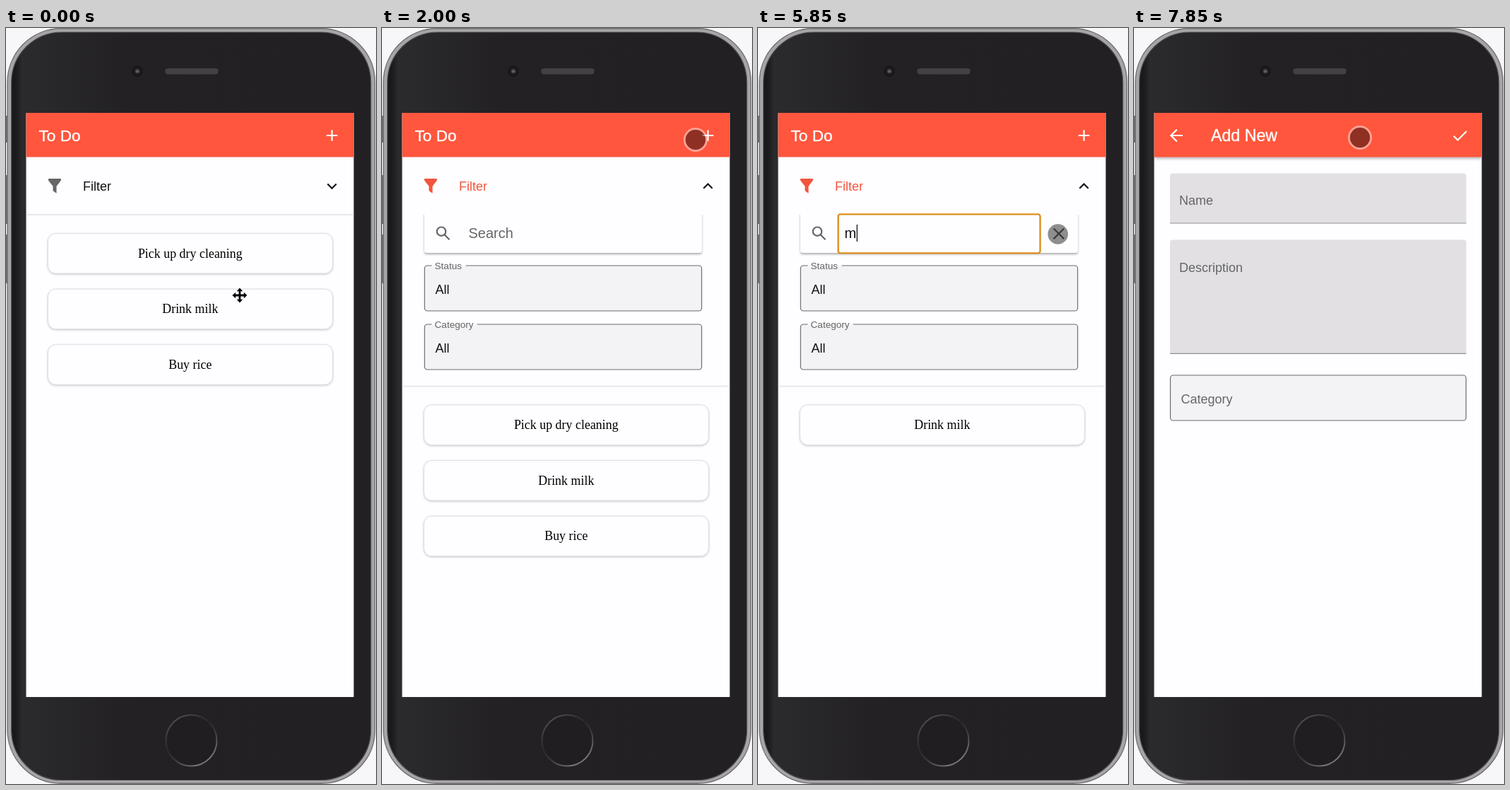
An HTML page that plays this animation: 524x1069 px, repeating every 8000 ms.

```html
<!DOCTYPE html>
<html lang="en">
<head>
<meta charset="utf-8">
<title>To do list</title>
<style>
  html, body { margin: 0; width: 100%; height: 100%; overflow: hidden; background: #f7f6f9; }
  svg { display: block; width: 100vw; height: 100vh; }
  text { font: 18px "Liberation Sans", Arial, sans-serif; fill: #111; }
  .title { font-size: 22.6px; fill: #fff; stroke: #fff; stroke-width: .4; }
  .hint { fill: #666; }
  .label { font-size: 13.6px; fill: #666; }
  .big { font-size: 20px; }
  .line { fill: none; stroke-width: 2.2; }
  .light { stroke: #fff; }
  .grey { stroke: #666; }
  .dark { stroke: #111; }
  .outlined { fill: #f3f2f5; stroke: #6c6b6e; stroke-width: 1.2; }
  .card rect { fill: #fefdff; stroke: #e0dfe5; filter: drop-shadow(0 1px 1.5px rgba(0, 0, 0, .22)); }
  .card text { font: 17.93px "Liberation Serif", "Times New Roman", serif; fill: #000; text-anchor: middle; }
  #searchBox { fill: #fefdff; filter: drop-shadow(0 2px 1.8px rgba(0, 0, 0, .32)); }
  .field { fill: #e2e0e3; }
</style>
</head>
<body>
<svg viewBox="0 0 524 1069" preserveAspectRatio="none">
  <defs>
    <linearGradient id="bodyFill">
      <stop offset="0" stop-color="#171618"/>
      <stop offset=".012" stop-color="#1b1a1c"/>
      <stop offset=".03" stop-color="#2b2a2c"/>
      <stop offset=".3" stop-color="#232123"/>
      <stop offset="1" stop-color="#222022"/>
    </linearGradient>
    <linearGradient id="ringStroke" x1=".15" y1="0" x2=".85" y2="1">
      <stop offset="0" stop-color="#555355"/>
      <stop offset=".4" stop-color="#2b292b"/>
      <stop offset=".6" stop-color="#3a383a"/>
      <stop offset=".9" stop-color="#777577"/>
      <stop offset="1" stop-color="#444244"/>
    </linearGradient>
    <pattern id="mesh" width="3" height="3" patternUnits="userSpaceOnUse">
      <rect width="3" height="3" fill="#4b494b"/>
      <path d="M0 0h1.5v1.5h-1.5zM1.5 1.5h1.5v1.5h-1.5z" fill="#3b393b"/>
    </pattern>
    <clipPath id="screenClip"><rect x="28.5" y="120" width="464" height="826"/></clipPath>
    <clipPath id="rowClip"><rect x="28.5" y="182.5" width="464" height="81.5"/></clipPath>
    <clipPath id="panelClip"><rect x="28.5" y="264" width="464" height="242"/></clipPath>
  </defs>

  <g id="phone">
    <rect width="524" height="1069" fill="#f7f6f9"/>
    <path d="M0 124h3v38h-3zM0 208h3v69h-3zM0 292h3v69h-3z" fill="#6d6c6e"/>
    <rect x="2" y=".7" width="520.5" height="1067.6" rx="76" fill="#a7a5a8" stroke="#6f6d70" stroke-width="1.4"/>
    <rect x="7.7" y="6" width="509" height="1057.5" rx="71" fill="url(#bodyFill)" stroke="#4c4a4d" stroke-width="1.2"/>
    <circle cx="186" cy="61" r="8" fill="#19181a"/>
    <circle cx="186" cy="61" r="3.6" fill="#3d3b40"/>
    <circle cx="186" cy="61.5" r="1.4" fill="#77757b"/>
    <rect x="225.5" y="57" width="75" height="8.5" rx="4" fill="url(#mesh)"/>
    <circle cx="262.5" cy="1007.5" r="36" fill="#201e20" stroke="url(#ringStroke)" stroke-width="2"/>
    <rect x="28.5" y="120" width="464" height="826" fill="#fefdff"/>
  </g>

  <g clip-path="url(#screenClip)">
    <g id="listPage">
      <g id="panel" clip-path="url(#panelClip)">
        <rect id="searchBox" x="60" y="258" width="393" height="60" rx="3"/>
        <g class="line grey">
          <circle cx="84" cy="287.7" r="6.2"/>
          <path d="M88.5 292.2l7 7"/>
        </g>
        <text id="placeholder" class="big hint" x="122.5" y="297">Search</text>
        <g id="selects"></g>
      </g>
      <g id="focus">
        <rect x="113.6" y="263.4" width="286" height="55" rx="3" fill="#fefdff" stroke="#dc8f1c" stroke-width="2.4"/>
        <text id="typed" class="big" x="122.5" y="297">m</text>
        <path id="caret" d="M0 278v24" stroke="#111" stroke-width="1.3"/>
      </g>
      <path id="clear" class="line grey" d="M418.7 283.5l14.6 14.6m0-14.6l-14.6 14.6"/>
      <circle id="ripple" cx="377" cy="184" fill="#000" clip-path="url(#rowClip)"/>
      <path id="funnel" d="M60.3 213h17.2q1 1.6 0 3l-6 7.8v10l-5-3.6v-6.4l-6.2-7.8q-1-1.4 0-3z"/>
      <text id="filterText" x="109" y="230">Filter</text>
      <path id="chevron" class="line dark" d="M-6.2-3.1L0 3.1L6.2-3.1"/>
      <path id="divider" d="M28.5 264h464" stroke="#e2e1e5" stroke-width="1.4"/>
      <g id="cards"></g>
      <rect x="28.5" y="120" width="464" height="62.5" fill="#ff563d"/>
      <text class="title" x="46.5" y="160.3">To Do</text>
      <path class="line light" d="M453.8 152h15.6m-7.8-7.8v15.6"/>
    </g>

    <g id="loading">
      <circle id="spinner" cx="260.5" cy="533" r="24" fill="none" stroke="#e9533c" stroke-width="4.8" stroke-dasharray="13.5 200"/>
    </g>

    <g id="formPage">
      <rect x="28.5" y="120" width="464" height="62.5" fill="#ff563d" style="filter:drop-shadow(0 2px 2px rgba(0,0,0,.3))"/>
      <path class="line light" d="M69 152H52.5m8.2-8.4L52.3 152l8.4 8.4"/>
      <text class="title" x="109" y="160.3" style="font-size:23.2px">Add New</text>
      <path class="line light" d="M452.8 152.8l5.7 5.7l12.4-12.6"/>
      <path class="field" d="M51 276v-66.500q0-4 4-4h411.500q4 0 4 4v66.500z"/>
      <path class="field" d="M51 460.500v-157q0-4 4-4h411.500q4 0 4 4v157z"/>
      <path d="M51 276h419.500M51 460.300h419.500" stroke="#918f93" stroke-width="1.2"/>
      <rect class="outlined" x="51.500" y="491" width="418.700" height="64" rx="4"/>
      <text class="hint" x="64" y="250">Name</text>
      <text class="hint" x="64" y="344.500">Description</text>
      <text class="hint" x="66.500" y="531">Category</text>
    </g>

    <g id="pointer">
      <g id="touch">
        <circle r="15.500" fill="none" stroke="#fff" stroke-width="3" stroke-opacity=".45"/>
        <circle r="14.300" fill="#000" fill-opacity=".44"/>
      </g>
      <path id="mover" d="M0-10.500l4.300 4.700H1.400V-1.400H5.800V-4.300L10.500 0L5.800 4.300V1.400H1.400V5.800H4.300L0 10.500L-4.300 5.800H-1.400V1.400H-5.800V4.300L-10.500 0L-5.800-4.300V-1.400H-1.400V-5.800H-4.300z" stroke="#fff" stroke-width="1.200" paint-order="stroke"/>
    </g>
  </g>
</svg>
<script>
const $ = id => document.getElementById(id);
const show = (id, on) => $(id).style.display = on ? '' : 'none';
const set = (id, attrs) => { for (const k in attrs) $(id).setAttribute(k, attrs[k]); };
const clamp = v => Math.max(0, Math.min(1, v));

const LOOP = 8000, STEP = 1000 / 7;
const CARD_TOP = 290.5, CARD_GAP = 78.6, PANEL_HEIGHT = 242.5;

$('selects').innerHTML = [['Status', 336, 48], ['Category', 419, 64]].map(([name, y, gap]) => `
  <rect class="outlined" x="60.3" y="${y}" width="392.4" height="64" rx="4"/>
  <text x="75.5" y="${y + 40}">All</text>
  <g class="floating">
    <path d="M70.5 ${y}h${gap}" stroke="#f9f8fb" stroke-width="2.4"/>
    <text class="label" x="74.5" y="${y + 5}">${name}</text>
  </g>`).join('');

$('cards').innerHTML = ['Pick up dry cleaning', 'Drink milk', 'Buy rice'].map(name => `
  <g class="card">
    <rect x="59.5" y="0" width="403" height="56.5" rx="11"/>
    <text x="260.8" y="34">${name}</text>
  </g>`).join('');
const cards = [...document.querySelectorAll('.card')];
const labels = [...document.querySelectorAll('.floating')];

// Pointer waypoints: time, x, y
const path = [
  [0, 331, 378], [570, 350, 320], [1000, 378, 195], [1140, 377, 184], [1285, 377, 184],
  [1428, 394, 178], [1714, 430, 160], [2285, 458, 156], [2428, 460, 156], [3000, 415, 220],
  [3428, 157, 305], [4000, 129, 303], [5285, 136, 302], [5428, 381, 301], [5571, 381, 301],
  [5714, 424, 292], [6285, 427, 290], [6714, 437, 257], [7285, 469, 159], [7714, 469, 159],
  [7857, 320, 155], [8000, 320, 155]
];

function pointerAt(t) {
  const i = path.findIndex((p, n) => n && t <= p[0]);
  const [t0, x0, y0] = path[i - 1], [t1, x1, y1] = path[i];
  const k = (t - t0) / (t1 - t0);
  return [x0 + (x1 - x0) * k, y0 + (y1 - y0) * k];
}

function draw(t) {
  const between = (a, b) => t >= a && t < b;
  const open = t >= 1420, filtered = between(4710, 6140);
  const typed = between(4280, 6000), focused = between(3570, 6000);
  const shift = open ? PANEL_HEIGHT : 0;

  show('listPage', t < 7420);
  show('loading', between(7420, 7570));
  show('formPage', t >= 7570);

  show('panel', open);
  labels.forEach(label => label.style.display = t >= 1570 ? '' : 'none');
  set('divider', { transform: `translate(0 ${shift})` });
  set('funnel', { fill: open ? '#f2553d' : '#666' });
  $('filterText').style.fill = open ? '#f2553d' : '#111';
  set('chevron', { transform: `translate(461.6 223.6) scale(1 ${open ? -1 : 1})` });

  show('ripple', between(1280, 2000));
  set('ripple', {
    r: Math.max(0, Math.min(360, (t - 1216) * .8)),
    'fill-opacity': .13 * (1 - clamp((t - 1640) / 300))
  });

  show('focus', focused);
  show('placeholder', !typed);
  show('typed', typed);
  show('clear', between(4710, 6000));
  show('caret', !between(4000, 4280) && !between(4850, 5280));
  set('caret', { transform: `translate(${typed ? 140.3 : 123.5} 0)` });
  if (focused && !typed) {
    $('focus').after($('placeholder'));
  }

  cards.forEach((card, i) => {
    const slot = filtered ? 0 : i;
    card.style.display = filtered && i !== 1 ? 'none' : '';
    card.setAttribute('transform', `translate(0 ${CARD_TOP + shift + slot * CARD_GAP})`);
  });

  set('spinner', { transform: `rotate(${210 + (t - 7428) * .36} 260.5 533)` });

  const [x, y] = pointerAt(t);
  const offset = (y - CARD_TOP) % CARD_GAP;
  const overCard = !open && y > CARD_TOP && offset < 56.5;
  set('pointer', { transform: `translate(${x} ${y})` });
  show('pointer', !between(4280, 5280));
  show('touch', !overCard);
  show('mover', overCard);
}

function tick() {
  const t = performance.now() % LOOP;
  // The picture advances seven times a second
  draw(Math.min(55, Math.floor((t + 9) / STEP)) * STEP);
  requestAnimationFrame(tick);
}
tick();
</script>
</body>
</html>
```
